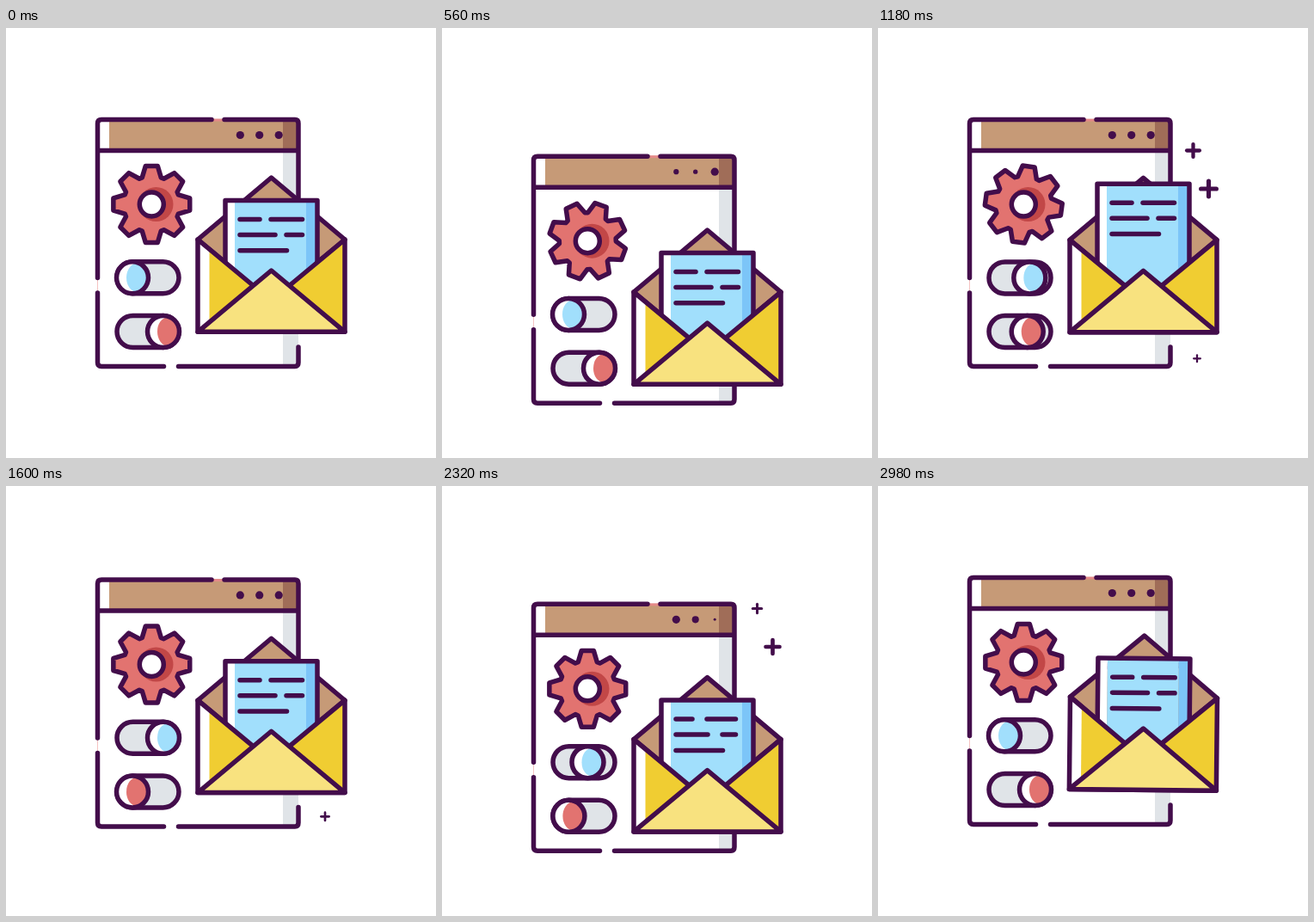
Recreate the animation shown at these times as an HTML page with a canvas. Size 500 by 500 pixels, loop 3 s.

```html
<!DOCTYPE html>
<html lang="en">
<head>
<meta charset="utf-8">
<title>Mail settings</title>
<style>
html, body { margin: 0; width: 100%; height: 100%; overflow: hidden; background: #fff; }
canvas { display: block; width: 500px; height: 500px; }
</style>
</head>
<body>
<canvas id="stage" width="500" height="500"></canvas>
<script>
const c = document.getElementById('stage').getContext('2d');
const INK = '#430d4b', BROWN = '#c69a77', GREY = '#e0e4e8', RED = '#e27370', BLUE = '#a1dffc';
const LOOP = 3000, HALF = 1500;

const clamp = x => Math.max(0, Math.min(1, x));

// cubic-bezier(.42, 0, .58, 1)
function ease(x) {
  if (x <= 0) return 0;
  if (x >= 1) return 1;
  let lo = 0, hi = 1;
  for (let i = 0; i < 20; i++) {
    const u = (lo + hi) / 2, v = 1 - u;
    if (1.26 * u * v * v + 1.74 * u * u * v + u * u * u < x) lo = u; else hi = u;
  }
  return lo * lo * (3 - 2 * lo);
}
const ramp = (t, start, length) => ease((t - start) / length);
const pulse = (t, start, peak, end) =>
  t < peak ? ramp(t, start, peak - start) : 1 - ramp(t, peak, end - peak);

function paint(path, fill, width = 5.5) {
  if (fill) { c.fillStyle = fill; c.fill(path); }
  if (width) { c.lineWidth = width; c.stroke(path); }
}
function poly(points, closed = true) {
  const p = new Path2D();
  points.forEach(([x, y]) => p.lineTo(x, y));
  if (closed) p.closePath();
  return p;
}
function ellipse(x, y, rx, ry = rx) {
  const p = new Path2D();
  p.ellipse(x, y, rx, ry, 0, 0, 2 * Math.PI);
  return p;
}
function box(color, x, y, w, h) {
  c.fillStyle = color;
  c.fillRect(x, y, w, h);
}
const line = (x1, y1, x2, y2) => paint(poly([[x1, y1], [x2, y2]], false));

// Eight tapered teeth: angle offsets and radii per tooth
const gear = poly([...Array(8).keys()].flatMap(i =>
  [[-19.5, 33], [-9, 45], [9, 45], [19.5, 33]].map(([a, r]) => {
    const angle = (i * 45 + a) * Math.PI / 180;
    return [r * Math.sin(angle), -r * Math.cos(angle)];
  })));

function drawToggle(y, on, color) {
  const pill = new Path2D(), x = 147 + 36 * on;
  pill.roundRect(129, y - 18.5, 72, 37, 18.5);
  paint(pill, GREY);
  paint(ellipse(x, y, 18.5), '#fff', 0);
  paint(ellipse(x + 5, y, 12, 16.5), color, 0);
  paint(ellipse(x, y, 18.5));
}

function drawWindow(t, h) {
  c.save();
  c.translate(0, 43 * pulse(h, 0, 600, 1200));

  box('#fff', 107, 107, 233, 286);
  box(BROWN, 120, 107, 202, 35);
  box('#a06d58', 322, 107, 17, 35);
  box(GREY, 322, 143, 18, 250);
  box('#e48a88', 238, 105.5, 16, 3);
  box('#f6c3c2', 106, 288, 1, 22);

  // Frame with gaps
  const frame = new Path2D('M239 106.5H111Q106.5 106.5 106.5 111V290.5' +
    'M106.5 308V389Q106.5 393.5 111 393.5H183.5M200.5 393.5H336Q340 393.5 340 389V371' +
    'M340 335V111Q340 106.5 336 106.5H254M106.5 142.5H340');
  paint(frame);

  [272.3, 294.7, 317.2].forEach((x, i) => {
    const low = 440 + 230 * i;
    paint(ellipse(x, 124.5, 4.6 * (1 - pulse(h, low - 200, low, low + 200))), INK, 0);
  });

  c.save();
  c.translate(169.3, 205);
  c.rotate(Math.PI * clamp((t - 40) / 1440));
  paint(gear, RED);
  c.restore();
  paint(ellipse(174.5, 205, 20), '#c24747', 0);
  paint(ellipse(169.3, 205, 14), '#fff');

  drawToggle(290.3, ramp(t, 760, 600) - ramp(t, 2065, 600), BLUE);
  drawToggle(353, 1 - ramp(t, 970, 600) + ramp(t, 2275, 600), RED);
  c.restore();
}

function drawLetter(t, h) {
  c.save();
  c.translate(0, -20 * pulse(h, 1000, 1200, 1400));
  box('#fff', 255, 200.5, 11, 125);
  box(BLUE, 266, 200.5, 83, 125);
  box('#7cc5f8', 349, 200.5, 13, 125);
  const sheet = new Path2D();
  sheet.rect(255, 200.5, 107, 125);
  paint(sheet);

  const shrink = pulse(h, 560, 820, 1080);
  const cuts = t < HALF ? [1, 2, 5, 3, 14] : [4, 3, 4, 3, 0];
  [[272, 295, 222.5], [308, 344.5, 222.5], [272, 313, 240.5], [326, 344.5, 240.5], [272, 326.5, 258.8]]
    .forEach(([x1, x2, y], i) => line(x1, y, x2 - cuts[i] * shrink, y));
  c.restore();
}

function drawEnvelope(t, h) {
  const wobble = -8 * pulse(h, 1200, 1300, 1400) + 8 * (h < 1300 ? 0 : pulse(h, 1300, 1400, 1500));
  c.save();
  c.translate(308.5, 292 + 62.5 * pulse(h, 0, 630, 1215));
  c.rotate(wobble * Math.PI / 180);
  c.translate(-308.5, -292);

  paint(poly([[223, 246], [308.5, 174], [394, 246], [308.5, 317]]), BROWN);
  drawLetter(t, h);

  const sides = poly([[223, 246], [308.5, 317], [394, 246], [394, 353.3], [223, 353.3]]);
  paint(sides, '#f0cd32', 0);
  c.save();
  c.clip(sides);
  box('#fff', 223, 246, 13.5, 108);
  c.restore();
  paint(sides);
  paint(poly([[223, 353.3], [308.5, 282], [394, 353.3]]), '#f8e27f');
  c.restore();
}

function drawSparkle(x, y, size) {
  if (size < 0.2) return;
  const width = size * 0.45, arm = size - width / 2;
  paint(poly([[x - arm, y], [x + arm, y]], false), null, width);
  paint(poly([[x, y - arm], [x, y + arm]], false), null, width);
}

function draw(now) {
  const t = now % LOOP, h = t % HALF;
  const twinkle = (a, b, rise) => pulse(t, a, a + 400, a + 800) + pulse(t, b, b + rise, b + 2 * rise);
  c.fillStyle = '#fff';
  c.fillRect(0, 0, 500, 500);
  c.strokeStyle = INK;
  c.lineCap = c.lineJoin = 'round';
  drawWindow(t, h);
  drawEnvelope(t, h);
  drawSparkle(366.5, 142.5, 10 * twinkle(840, 2080, 400));
  drawSparkle(384.5, 187, 11.5 * twinkle(800, 2010, 400));
  drawSparkle(371, 384.3, 12 * twinkle(1000, 2290, 340));
}

const start = performance.now();
function tick() {
  draw(performance.now() - start);
  requestAnimationFrame(tick);
}
tick();
</script>
</body>
</html>
```
